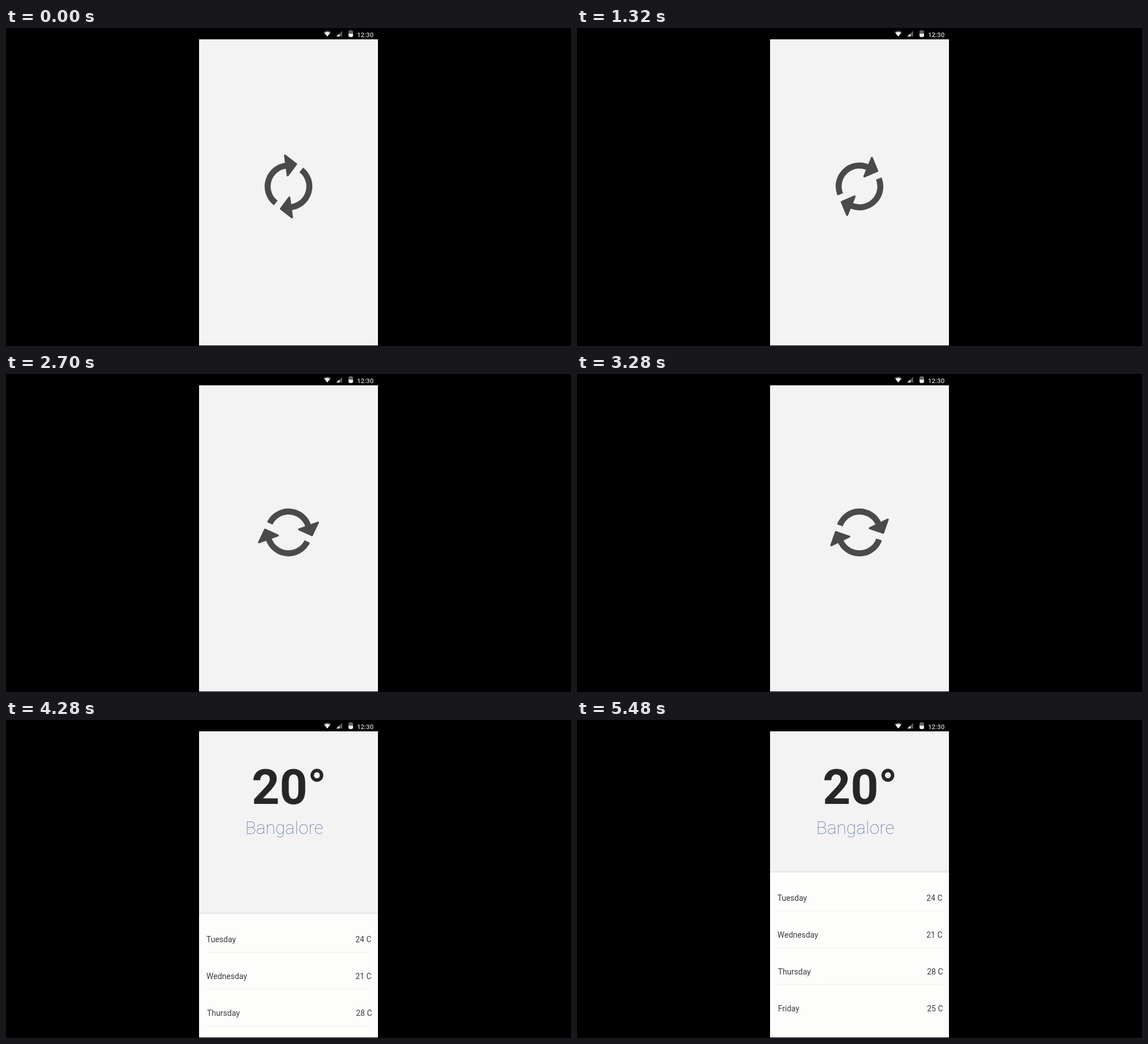
These frames come from a looping animation (998 by 561 pixels, 5500 ms). An HTML page:

```html
<!DOCTYPE html>
<html lang="en">
<head>
<meta charset="utf-8">
<title>Weather</title>
<style>
  html, body { margin: 0; width: 100%; height: 100%; overflow: hidden; background: #000; }
  svg { display: block; width: 998px; height: 561px; font-family: Roboto, sans-serif; }
  #rows { font-size: 14px; fill: #3c3c3c; }
  #rows line { stroke: #e6e6e2; stroke-dasharray: 2 1; }
</style>
</head>
<body>
<svg viewBox="0 0 998 561">
  <defs>
    <clipPath id="screen"><rect x="341" y="20" width="316" height="540"/></clipPath>
    <linearGradient id="shade" x2="0" y2="1">
      <stop offset="0" stop-opacity="0"/>
      <stop offset="1" stop-opacity=".07"/>
    </linearGradient>
    <g id="arrow">
      <path d="M-22.4 29.2A36.8 36.8 0 0 1-3.2-36.7" fill="none" stroke="#4a4a4a" stroke-width="10.6"/>
      <path d="M-6.5-54.5L13.3-39.5L-1.5-19.5Z" fill="#4a4a4a" stroke="#4a4a4a" stroke-width="3.5" stroke-linejoin="round"/>
    </g>
  </defs>

  <rect width="998" height="561"/>
  <rect x="341" y="20" width="316" height="540" fill="#f3f3f3"/>

  <!-- status bar -->
  <path d="M561 7Q567.5 2.5 574 7L567.5 15Z" fill="#555"/>
  <path d="M562.5 8.5Q567.5 5.5 572.5 8.5L567.5 15Z" fill="#fff"/>
  <path d="M594 5V15H583.5Z" fill="#555"/>
  <path d="M589 10V15H583.5Z" fill="#fff"/>
  <rect x="605" y="4" width="8" height="12" rx="3" fill="#666"/>
  <path d="M605 10H613V13Q613 16 610 16H608Q605 16 605 13Z" fill="#eee"/>
  <text x="620" y="15.5" font-size="11.5" font-weight="500" fill="#d0d0d0">12:30</text>

  <g id="spinner">
    <use href="#arrow"/>
    <use href="#arrow" transform="rotate(180)"/>
  </g>

  <g id="today" text-anchor="middle">
    <text x="500" y="147.5" font-size="86" font-weight="700" fill="#262626">20°</text>
    <text x="491.5" y="201" font-size="31.8" font-weight="100" fill="#5a72a8">Bangalore</text>
  </g>

  <g clip-path="url(#screen)">
    <g id="sheet">
      <rect x="341" y="-4" width="316" height="4" fill="url(#shade)"/>
      <rect x="341" width="316" height="300" fill="#fdfdfc"/>
      <g id="rows"></g>
    </g>
  </g>
</svg>
<script>
  const $ = id => document.getElementById(id);
  const clamp = v => Math.min(1, Math.max(0, v));
  const progress = (t, start, length) => clamp((t - start) / length);

  const LOOP = 5500, TURN = 1200, HOLD = 20;
  const SHEET_FROM = 565, SHEET_TO = 269;

  const days = [['Tuesday', 24], ['Wednesday', 21], ['Thursday', 28], ['Friday', 25]];
  $('rows').innerHTML = days.map(([day, temp], i) => {
    const y = 50 + 65 * i, shift = i > 1 ? 1 : 0;
    const rule = i < 3 ? `<line x1="355" x2="646" y1="${y + 17.5}" y2="${y + 17.5}"/>` : '';
    return `<text x="${354 + shift}" y="${y}">${day}</text>
      <text x="${645.5 + shift}" y="${y}" text-anchor="end">${temp} C</text>${rule}`;
  }).join('');

  function draw(t) {
    // each turn rests briefly before the next
    const angle = Math.min(t % (TURN + HOLD), TURN) * 360 / TURN;
    $('spinner').setAttribute('transform', `translate(499 279.5) rotate(${angle})`);
    $('spinner').setAttribute('opacity', 1 - progress(t, 3420, 120));
    $('today').setAttribute('opacity', progress(t, 3540, 240));

    const left = 1 - progress(t, 3935, 688);
    const top = SHEET_TO + (SHEET_FROM - SHEET_TO) * left * left;
    $('sheet').setAttribute('transform', `translate(0 ${top})`);
  }

  const start = performance.now();
  function tick() {
    draw((performance.now() - start) % LOOP);
    requestAnimationFrame(tick);
  }
  tick();
</script>
</body>
</html>
```
